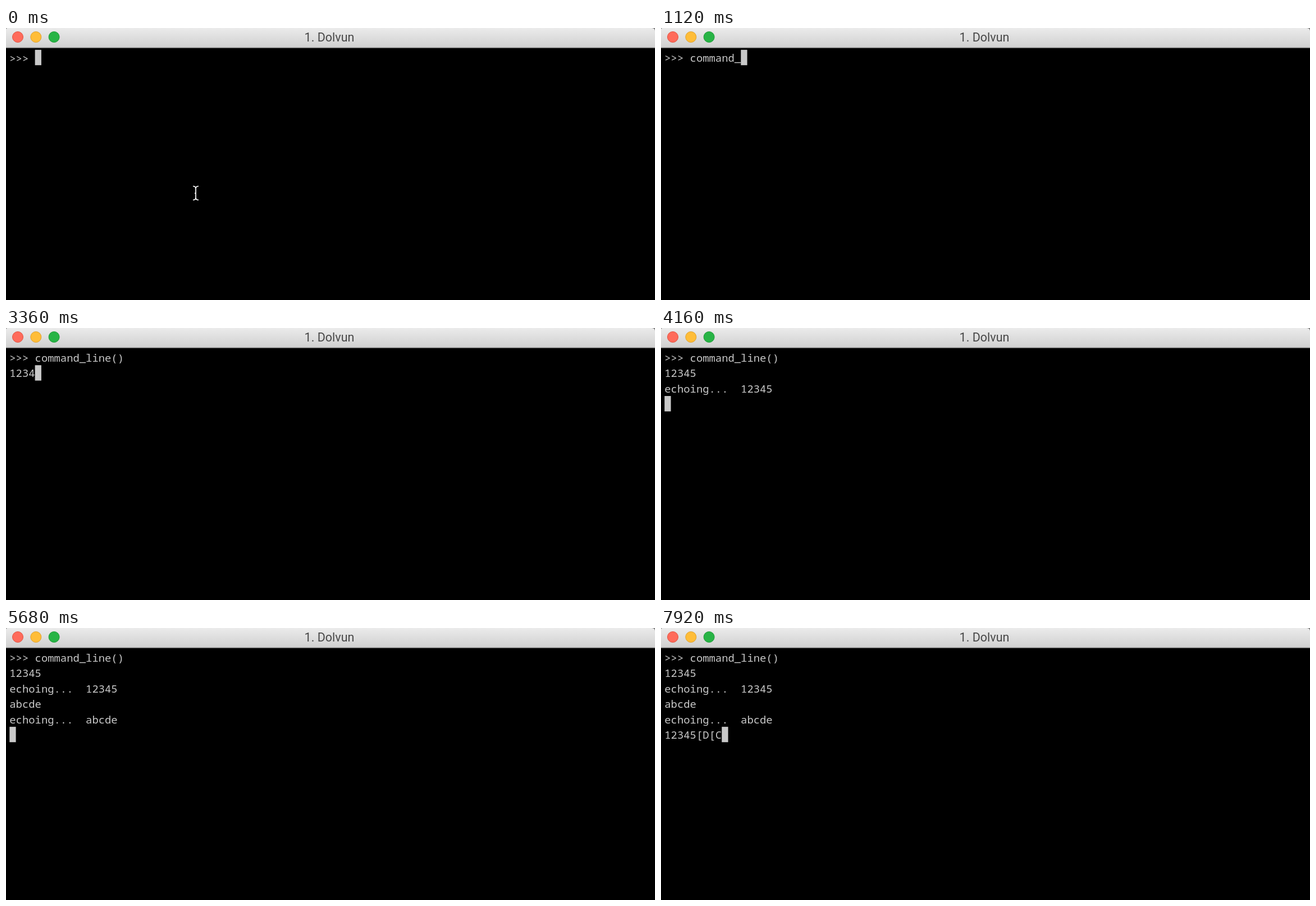
An HTML page that plays this animation: 1156x484 px, repeating every 8000 ms.

```html
<!DOCTYPE html>
<html lang="en">
<head>
<meta charset="utf-8">
<title>Terminal</title>
<style>
  html, body { margin: 0; width: 100%; height: 100%; overflow: hidden; background: #000; }
  svg { display: block; }
  .title { font: 21.5px Roboto, sans-serif; fill: #474747; text-anchor: middle; }
  .line { font: 18.88px "Noto Sans Mono", monospace; fill: #c9c9c9; white-space: pre; }
</style>
</head>
<body>
<svg width="1156" height="484" viewBox="0 0 1156 484">
  <defs>
    <linearGradient id="bar" x2="0" y2="1">
      <stop stop-color="#ebebeb"/>
      <stop offset="1" stop-color="#d0d0d0"/>
    </linearGradient>
  </defs>
  <rect width="1156" height="484"/>
  <rect width="1156" height="12" fill="#777"/>
  <path d="M0 35V3Q0 0 3 0H1150Q1156 0 1156 6V35Z" fill="url(#bar)"/>
  <rect y="34.5" width="1156" height="1.2" fill="#999"/>
  <circle cx="21" cy="16" r="9.5" fill="#ff6b5b" stroke="#e2513f"/>
  <circle cx="53.3" cy="16" r="9.5" fill="#ffbd38" stroke="#dfa02b"/>
  <circle cx="85.6" cy="16" r="9.5" fill="#28b446" stroke="#1c9a34"/>
  <text class="title" x="576" y="24">1. Dolvun</text>
  <g id="screen"></g>
  <rect id="caret" width="11.3" height="27.4" fill="#c9c9c9"/>
  <path id="pointer" d="M333 281.5Q338 281.5 338 286V302Q338 306 333 306M343 281.5Q338 281.5 338 286M338 302Q338 306 343 306M336 294H338"
        fill="none" stroke="#fff" stroke-width="1.7"/>
</svg>
<script>
const LOOP = 8000, LEFT = 6.3, TOP = 38.8, CELL = 11.33, ROW = 27.4;
const FIRST_KEY = 320;

// Each entry: time in ms, then the output that appears at that time.
const output = [[0, '>>> ']];
const type = (text, start, step) =>
  [...text].forEach((char, i) => output.push([start + i * step, char]));

type('command_line()', FIRST_KEY, 105);
output.push([2080, '\n']);
type('12345', 2800, 160);
output.push([3760, '\nechoing...  12345\n']);
type('abcde', 4400, 140);
output.push([5200, '\nechoing...  abcde\n']);
output.push([6120, '1'], [6440, '2']);
type('345', 6720, 160);
output.push([7360, '[D'], [7680, '[C']);

const byId = id => document.getElementById(id);
const rows = Array.from({ length: 6 }, () => {
  const row = document.createElementNS('http://www.w3.org/2000/svg', 'text');
  row.setAttribute('class', 'line');
  row.setAttribute('x', LEFT);
  return byId('screen').appendChild(row);
});

function draw(now) {
  const t = now % LOOP;
  const idle = t < FIRST_KEY;
  const lines = output.filter(([time]) => time <= t).map(([, text]) => text).join('').split('\n');
  rows.forEach((row, i) => {
    row.setAttribute('y', 60 + i * ROW + (idle ? 1 : 0));
    row.textContent = lines[i] || '';
  });
  const last = lines.length - 1;
  byId('caret').setAttribute('x', LEFT + lines[last].length * CELL);
  byId('caret').setAttribute('y', TOP + last * ROW);
  byId('pointer').setAttribute('visibility', idle ? 'visible' : 'hidden');
}

const begin = performance.now();
function tick() {
  draw(performance.now() - begin);
  requestAnimationFrame(tick);
}
tick();
</script>
</body>
</html>
```
